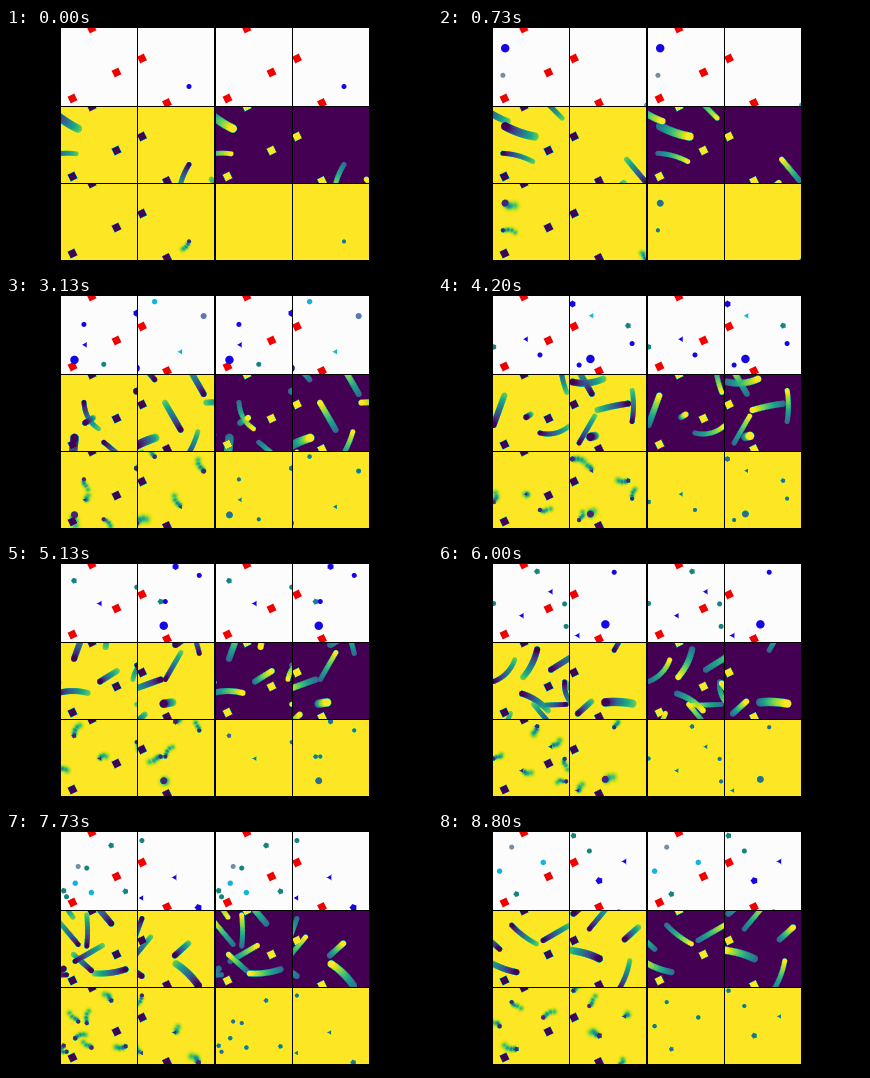
Write a matplotlib script that moves like this. It is 426 by 240 pixels and loops after 8.87 s.

```python
import numpy as np
import matplotlib.pyplot as plt
from matplotlib import colormaps
from matplotlib.animation import FuncAnimation
from matplotlib.colors import to_rgb

W, H, DPI = 426, 240, 100
FRAMES, LOOP = 133, 8870
SIZE = 78
COLS, ROWS = (54, 131, 209, 286), (0, 78, 155)
HORIZON = 12          # frames of future shown in the middle row
SPEED = 2.6           # pixels per frame
BEND = 40             # arc length after which a path runs straight

BLUE, TEAL, RED, WHITE = "#1606e4", "#148480", "#f00000", 0.99
# kind: colour, radius, sides (0 is a disc)
KINDS = dict(
    ball=(BLUE, 4.2, 0), bead=(BLUE, 2.5, 0), tri=(BLUE, 3.0, 3),
    hexa=(BLUE, 3.4, 6), penta=(BLUE, 3.7, 5), gem=(TEAL, 3.1, 5),
    teal=(TEAL, 2.5, 0), cyan=("#12b4dc", 2.7, 0), wedge=("#12b4dc", 3.0, 3),
    slate=("#7090a8", 2.5, 0), steel=("#5a78b4", 3.0, 0),
)

viridis = colormaps["viridis"]
gy, gx = np.mgrid[0:SIZE, 0:SIZE].astype(float)


def cover(x, y, r, sides=0, rot=0.0):
    """Soft-edged mask of a disc or a regular polygon."""
    dx, dy = gx - x, gy - y
    if sides == 0:
        return np.clip(r + 0.5 - np.hypot(dx, dy), 0, 1)
    angles = rot + 2 * np.pi * np.arange(sides) / sides
    dist = np.max([dx * np.cos(a) + dy * np.sin(a) for a in angles], axis=0)
    return np.clip(r * np.cos(np.pi / sides) + 0.5 - dist, 0, 1)


def ray(angle):
    return np.array([np.cos(angle), np.sin(angle)])


class Mover:
    """Runs along an arc that passes (x, y) at frame t."""

    def __init__(self, kind, t, x, y, heading, curl=0, pace=SPEED, stall=False):
        color, self.r, self.sides = KINDS[kind]
        self.color = to_rgb(color)
        self.t, self.start = t, np.array([x, y])
        self.heading, self.curl = np.radians([heading, curl])
        self.pace, self.stall = pace, stall

    def travel(self, t):
        u = t - self.t
        return 0.3 * u + 0.0012 * u ** 3 if self.stall else self.pace * u

    def at(self, t):
        s = self.travel(t)
        arc = np.clip(s, -BEND, BEND)
        half = self.curl * arc / 2
        chord = arc * np.sinc(half / np.pi) * ray(self.heading + half)
        return self.start + chord + (s - arc) * ray(self.heading + 2 * half)

    def seen(self, p, pad=0):
        m = self.r + 1 + pad
        return -m < p[0] < SIZE + m and -m < p[1] < SIZE + m


# kind, frame, x, y, heading in degrees, curl in degrees per pixel
left = [
    Mover("ball", 22, 42, 30, 10, -0.6),
    Mover("slate", 11, 13, 47, 5, 0.8),
    Mover("hexa", 32, 40, 20.5, 5, -0.6),
    Mover("teal", 20, 66, 8, 45),
    Mover("ball", 32, 5.5, 28.5, 60, 0.9),
    Mover("teal", 32, 10, 54, 8, 0.8),
    Mover("tri", 63, 34, 42.5, -32, stall=True),
    Mover("bead", 63, 50, 59, 10, -1.8),
    Mover("teal", 70, 71, 8, 75, -0.6),
    Mover("gem", 72, 10, 26, -70),
    Mover("gem", 90, 44, 9.5, 105, 0.9),
    Mover("teal", 90, 71, 62, 178),
    Mover("teal", 90, 3.5, 38, -25, -1.6),
    Mover("tri", 90, 32, 52, 20, 1),
    Mover("teal", 90, 72, 42, 90, -2),
    Mover("gem", 116, 49, 11, -130),
    Mover("slate", 116, 16, 32, -130),
    Mover("teal", 116, 26.5, 33, -85, -0.4),
    Mover("cyan", 124, 35, 39, -30),
    Mover("cyan", 124, 17.5, 48, 222, pace=2),
    Mover("gem", 124, 42, 63, 178, 0.7),
    Mover("slate", 132, 21, 16.5, 45, -0.6),
]
right = [
    Mover("bead", 0, 51.5, 58, 122, -0.8),
    Mover("cyan", 32, 40.5, 33, 230),
    Mover("steel", 32, 57, 13, 208),
    Mover("steel", 32, 68.5, 55, -72, -1.2),
    Mover("ball", 72, 25, 61.5, -12, 0.6, stall=True),
    Mover("hexa", 63, 5.5, 8, 10, -1.2),
    Mover("wedge", 63, 21, 17, 240),
    Mover("gem", 63, 56, 29.5, 172, -0.3),
    Mover("bead", 63, 63, 44.5, -82, -0.6),
    Mover("bead", 90, 46, 5.5, -60),
    Mover("tri", 103, 24, 57, -42, pace=1.5),
    Mover("tri", 116, 2, 64, 215),
    Mover("penta", 124, 45, 58, 219, -0.7),
    Mover("teal", 116, 3.5, 10.5, 110),
    Mover("teal", 132, 21.5, 16.5, -50),
    Mover("gem", 132, 6, 1.5, -40),
    Mover("slate", 132, 50.5, 77, -60, -0.7),
]


def blocks(*centres):
    return np.max([cover(x, y, 5.2, 4, -0.45) for x, y in centres], axis=0)


scenes = [(left, blocks((31, 0), (56, 44), (12, 70))),
          (right, blocks((4.5, 30), (29.5, 74.5)))]


def paint(img, mask, color):
    img += mask[..., None] * (np.asarray(color) - img)


def render(movers, walls, t):
    """The five views of one scene at frame t."""
    view = np.full((SIZE, SIZE, 3), WHITE)
    paint(view, walls, to_rgb(RED))
    first, last = 1 - walls, walls.copy()
    guess, spots = 1 - walls, np.ones((SIZE, SIZE))
    for n, m in enumerate(movers):
        for k in np.arange(0, HORIZON + 0.5, 0.5):
            x, y = p = m.at(t + k)
            if m.seen(p):
                c = cover(x, y, m.r)
                first = np.minimum(first, 1 - c * (1 - k / 16))
                last = np.maximum(last, c * (0.36 + 0.64 * k / HORIZON))
        x, y = p = m.at(t)
        if not m.seen(p):
            continue
        c = cover(x, y, m.r, m.sides)
        paint(view, c, m.color)
        spots = np.minimum(spots, 1 - 0.65 * cover(x, y, 0.8 * m.r, m.sides))
        guess = np.minimum(guess, 1 - 0.9 * cover(x, y, 0.85 * m.r, m.sides))
        for k in range(1, 5):
            sx, sy = m.at(t + k) + 0.5 * k * ray(0.7 * t + 2 * n + k)
            s = 0.5 * m.r + 0.15 * k
            d2 = (gx - sx) ** 2 + (gy - sy) ** 2
            glow = (0.8 - 0.12 * k) * np.exp(-d2 / (2 * s * s))
            guess = np.minimum(guess, 1 - glow)
    return view, first, last, guess, spots


def shade(field):
    return viridis(np.clip(field, 0, 1))[..., :3]


def frame(t):
    img = np.zeros((H, W, 3))

    def put(row, col, tile):
        y, x = ROWS[row], COLS[col]
        img[y:y + SIZE, x:x + SIZE] = tile

    tiles = [render(movers, walls, t) for movers, walls in scenes]
    for col in range(4):
        view, first, last, guess, spots = tiles[col % 2]
        put(0, col, view)
        put(1, col, shade(first if col < 2 else last))
        put(2, col, shade(guess if col < 2 else spots))
    img[[78, 155, 232]] = 0
    img[:, [54, 131, 208, 209, 286, 363]] = 0
    return img


fig = plt.figure(figsize=(W / DPI, H / DPI), dpi=DPI, facecolor="black")
ax = fig.add_axes([0, 0, 1, 1])
ax.axis("off")
picture = ax.imshow(frame(0), interpolation="nearest", aspect="auto")


def update(t):
    picture.set_data(frame(t))
    return [picture]


anim = FuncAnimation(fig, update, frames=FRAMES, interval=LOOP / FRAMES,
                     repeat=True, repeat_delay=0, blit=False)
plt.show()
```
